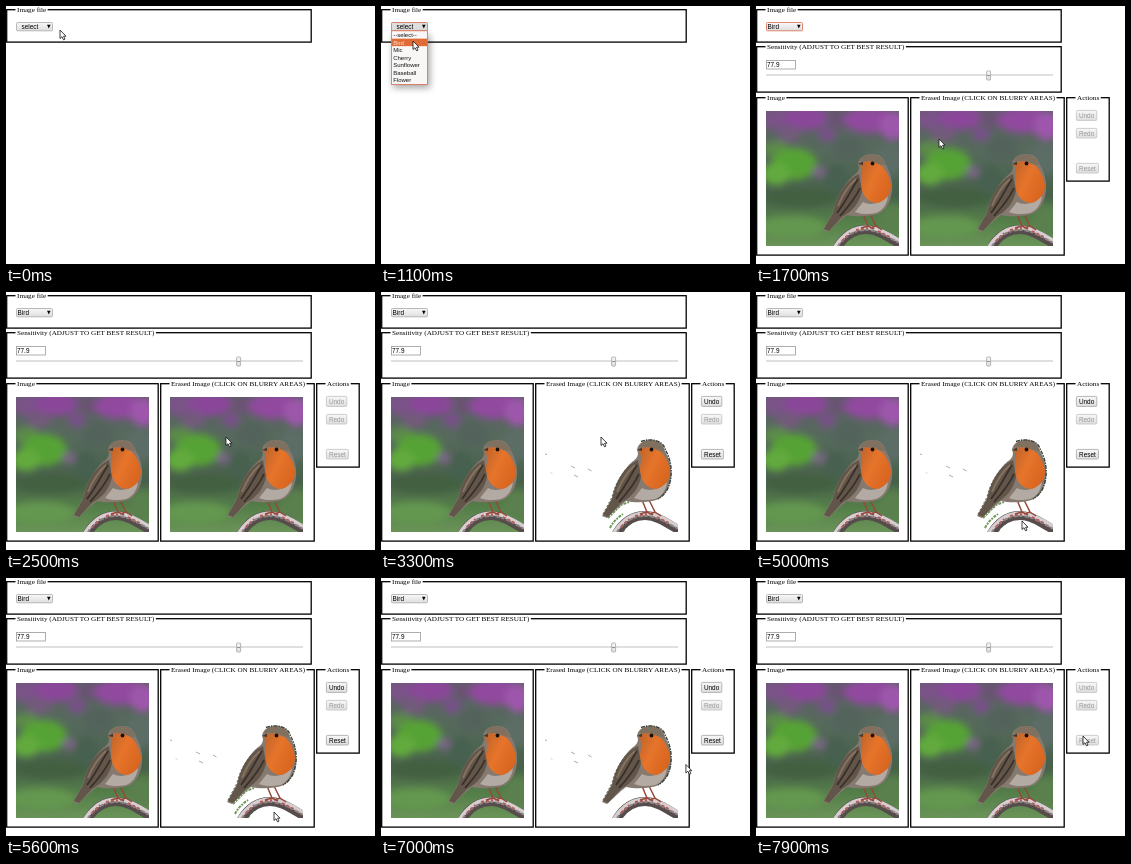
Recreate the animation shown at these times as an HTML page. Size 369 px wide and 258 px high, loop 8000 ms.

```html
<!DOCTYPE html>
<html lang="en">
<head>
<meta charset="utf-8">
<title>Image eraser</title>
<style>
html, body { margin: 0; width: 100%; height: 100%; overflow: hidden; background: #fff; }
svg { display: block; width: 100vw; height: 100vh; }
.legend { font: 7.15px "Liberation Serif", serif; }
.ui { font: 6.4px "Liberation Sans", sans-serif; }
#menu { font-size: 6px; }
</style>
</head>
<body>
<svg id="stage" viewBox="0 0 369 258">
  <defs>
    <linearGradient id="face" x2="0" y2="1"><stop stop-color="#f8f8f8"/><stop offset="1" stop-color="#dedede"/></linearGradient>
    <linearGradient id="ground" x2="0" y2="1">
      <stop stop-color="#5d5f66"/><stop offset=".3" stop-color="#566a5c"/>
      <stop offset=".62" stop-color="#48604a"/><stop offset=".82" stop-color="#557f49"/><stop offset="1" stop-color="#6a9458"/>
    </linearGradient>
    <linearGradient id="breast" x2="1" y2=".6"><stop stop-color="#b9622c"/><stop offset=".5" stop-color="#e6742a"/><stop offset="1" stop-color="#d9651f"/></linearGradient>
    <filter id="soft" x="-50%" y="-50%" width="200%" height="200%"><feGaussianBlur stdDeviation="3.5"/></filter>
    <filter id="haze" x="-30%" y="-30%" width="160%" height="160%"><feGaussianBlur stdDeviation=".7"/></filter>
    <filter id="shade" x="-50%" y="-50%" width="200%" height="200%"><feGaussianBlur stdDeviation="3.5"/></filter>
    <clipPath id="photo"><rect x="10" y="105" width="133" height="135"/></clipPath>
    <path id="body" d="M102 158C103 151 109 148 116 148C123 148 128 151 130 159C134 166 137 175 136 184C135 196 130 203 124 207C115 211 99 211 91 209L86 213L72 226L67 224L77 206C80 192 87 179 97 170C103 166 104 162 102 158Z"/>

    <g id="garden" clip-path="url(#photo)">
      <rect x="10" y="105" width="133" height="135" fill="url(#ground)"/>
      <g filter="url(#soft)">
        <ellipse cx="20" cy="113" rx="14" ry="11" fill="#7a5288"/>
        <ellipse cx="50" cy="112" rx="22" ry="12" fill="#8a469a"/>
        <ellipse cx="33" cy="129" rx="12" ry="7" fill="#735a7c"/>
        <ellipse cx="82" cy="113" rx="9" ry="9" fill="#6a5273"/>
        <ellipse cx="115" cy="114" rx="27" ry="13" fill="#91499f"/>
        <ellipse cx="137" cy="120" rx="13" ry="14" fill="#9d57ab"/>
        <ellipse cx="71" cy="128" rx="9" ry="7" fill="#78508a"/>
        <ellipse cx="92" cy="142" rx="16" ry="13" fill="#52645c"/>
        <ellipse cx="134" cy="154" rx="15" ry="16" fill="#5c6d66"/>
        <ellipse cx="20" cy="143" rx="13" ry="8" fill="#5b8a49"/>
        <ellipse cx="38" cy="158" rx="23" ry="16" fill="#57a336"/>
        <ellipse cx="20" cy="168" rx="14" ry="11" fill="#62aa3c"/>
        <ellipse cx="63" cy="166" rx="7" ry="6" fill="#7a6585"/>
        <ellipse cx="80" cy="174" rx="12" ry="15" fill="#466050"/>
        <ellipse cx="45" cy="192" rx="36" ry="9" fill="#42603f"/>
        <ellipse cx="36" cy="221" rx="34" ry="11" fill="#63974f"/>
        <ellipse cx="137" cy="214" rx="15" ry="16" fill="#5a804d"/>
      </g>
    </g>

    <g id="bird" clip-path="url(#photo)">
      <path d="M80 244C88 229 98 223.500 110 223.500C122 223.500 132 231 147 240" fill="none" stroke="#574c4c" stroke-width="9"/>
      <path d="M79 241C88 227 98 221.500 110 221.500C122 221.500 132 228 147 237" fill="none" stroke="#d6ced0" stroke-width="4"/>
      <path d="M82 240C90 229 99 224 110 224C122 224 132 231 145 238" fill="none" stroke="#8f8585" stroke-width="2" stroke-dasharray="3 2 5 1"/>
      <path d="M86 235L94 227M100 224L112 222M122 225L134 231" stroke="#b65a5a" stroke-width="1.800" stroke-dasharray="3 2"/>
      <path d="M107 208L112 220L105 222M112 220L118 223M114 208L120 220L114 222M120 220L126 224" fill="none" stroke="#96483a" stroke-width="1.500"/>
      <g filter="url(#haze)">
        <use href="#body" fill="#867a70"/>
        <path d="M107 196C114 200 124 198 132 190C131 199 126 205 120 207C112 209 103 208 99 206Z" fill="#b3aaa3"/>
        <path d="M104 155C106 149 111 148.500 116 148.500C123 149 128 152 129.500 159C124 159 117 156 112 155Z" fill="#80705f"/>
        <path d="M103 158C109 154 116 155 122 158C128 160 133 168 135 179C135 188 130 194 122 197C113 197 106 190 105 179C105 171 108 166 104 159Z" fill="url(#breast)"/>
        <path d="M103 168C94 172 85 182 80 196L77 207L68 223L73 225L86 211C97 205 104 196 106 185Z" fill="#62554a"/>
        <path d="M102 173C96 182 92 192 81 207M104 182C100 191 93 200 84 210" fill="none" stroke="#382f28" stroke-width="1.800"/>
        <path d="M100 173C92 180 86 190 82 200" fill="none" stroke="#86735f" stroke-width="2"/>
      </g>
      <path d="M102 158L107 155.500L107 159Z" fill="#453a32"/>
      <circle cx="116.500" cy="157.500" r="1.900" fill="#15110f"/>
    </g>

    <g id="rest" fill="none">
      <path d="M106 149.500C116 146 128 148 130.500 158C135 166 138 178 135 190C133 199 128 204 123 207" stroke="#39413a" stroke-width="1.400" stroke-dasharray="4 1 1.500 1"/>
      <path d="M68 222L77 205C80 191 88 179 98 170" stroke="#4f5a49" stroke-width=".9" stroke-dasharray="2 2"/>
      <path d="M10 162l2 .5M16 180.500l1 1M36 174l4 2M39 183l4 2M53 177l3.500 2" stroke="#888" stroke-width=".7"/>
    </g>
    <g id="fringe" fill="none" stroke="#6f9a5c" clip-path="url(#photo)">
      <path d="M75 236C78 230 82 226 88 222M73 226L86 213L94 210" stroke-width="2" stroke-dasharray="3 1 2 1"/>
      <path d="M88 240C91 235 94 232 98 230" stroke-width="1.500" stroke-dasharray="3 2"/>
    </g>
  </defs>

  <rect width="369" height="258" fill="#fff"/>
  <g id="frames"></g>
  <g id="panels">
    <rect x="10.500" y="54.500" width="29" height="8.500" fill="#fff" stroke="#999" stroke-width=".8"/>
    <text class="ui" x="11" y="61">77.9</text>
    <path d="M10 69H297" stroke="#c4bebe" stroke-width="1.200"/>
    <rect x="230.600" y="65" width="4" height="9" rx=".8" fill="url(#face)" stroke="#a5a5a5" stroke-width=".8"/>
    <path d="M231.200 69.500H234" stroke="#777" stroke-width=".8"/>
    <use href="#garden"/><use href="#bird"/>
    <g transform="translate(154)">
      <use id="back" href="#garden"/><use id="green" href="#fringe"/><use href="#bird"/><use id="edge" href="#rest"/>
    </g>
    <g id="buttons"></g>
  </g>
  <rect id="box" x="10.500" y="16.500" width="36" height="8.300" rx="1" stroke-width=".8"/>
  <text id="choice" class="ui" y="23"></text>
  <path d="M41 18.800h3.600l-1.800 3.600z"/>
  <g id="menu" class="ui">
    <rect x="12" y="29" width="37" height="53" opacity=".35" filter="url(#shade)"/>
    <rect x="10.500" y="24.800" width="36" height="53.700" fill="#f9f7f6" stroke="#d96b4e" stroke-width=".8"/>
    <rect id="mark" x="10.900" width="35.200" height="7.500" fill="#df6c36"/>
  </g>
  <path id="cursor" d="M0 0V8.500L2 6.700L3.500 9.800L5 9.100L3.600 6.200H6Z" fill="#fff" stroke="#111" stroke-width=".8" stroke-linejoin="round"/>
</svg>
<script>
const LOOP = 8000, STEP = 100, ROW = 7.55;
const $ = id => document.getElementById(id);

function add(parent, tag, attrs, text = "") {
  const el = document.createElementNS("http://www.w3.org/2000/svg", tag);
  set(el, attrs);
  el.textContent = text;
  return parent.appendChild(el);
}
function set(el, attrs) {
  for (const k in attrs) el.setAttribute(k, attrs[k]);
}
const show = (el, on) => set(el, { display: on ? "inline" : "none" });

function fieldset(parent, x, y, right, bottom, title) {
  add(parent, "rect", { x: x + .7, y: y + .7, width: right - x - 1.5, height: bottom - y - 1.6,
    fill: "none", stroke: "#000", "stroke-width": 1.3 });
  const label = add(parent, "text", { class: "legend", x: x + 11, y: y + 3 }, title);
  const gap = add(parent, "rect", { x: x + 9.5, y: y - 1, width: label.getComputedTextLength() + 3, height: 4, fill: "#fff" });
  parent.insertBefore(gap, label);
}
function button(y, w, h, label) {
  const face = add($("buttons"), "rect", { x: 320.4, y: y + .4, width: w, height: h, rx: 1, "stroke-width": .8 });
  const text = add($("buttons"), "text", { class: "ui", x: 320.4 + w / 2, y: y + 7.5, "text-anchor": "middle" }, label);
  return (on, down) => {
    set(face, { fill: down ? "#d2d2d2" : "url(#face)", stroke: on ? "#a5a5a5" : "#c2c2c2" });
    set(text, { fill: on ? "#000" : "#999" });
  };
}

fieldset($("frames"), 0, 3, 306, 37, "Image file");
const panels = add($("frames"), "g", {});
fieldset(panels, 0, 40, 306, 87, "Sensitivity (ADJUST TO GET BEST RESULT)");
fieldset(panels, 0, 91, 153, 250, "Image");
fieldset(panels, 154, 91, 309, 250, "Erased Image (CLICK ON BLURRY AREAS)");
fieldset(panels, 310, 91, 354, 176, "Actions");

const undo = button(104, 20.4, 10, "Undo");
const redo = button(122, 20.4, 9.6, "Redo");
const reset = button(157, 22, 9.6, "Reset");

const options = ["--select--", "Bird", "Mic", "Cherry", "Sunflower", "Baseball", "Flower"]
  .map((name, i) => add($("menu"), "text", { x: 12.2, y: 31 + i * ROW }, name));

// time, x, y of the pointer tip
const path = [
  [0, 54, 24], [300, 34, 18], [500, 34, 18], [1100, 32, 35], [1300, 32, 35],
  [1700, 183, 133], [2100, 220, 145], [3600, 220, 145], [4000, 255, 205], [4400, 266, 229],
  [5200, 266, 229], [5600, 268, 234], [6500, 268, 234], [7300, 327, 158], [LOOP, 327, 158]
];
function pointer(t) {
  const i = path.findIndex(p => p[0] > t);
  const [t0, x0, y0] = path[i - 1], [t1, x1, y1] = path[i];
  const k = (t - t0) / (t1 - t0);
  return [x0 + (x1 - x0) * k, y0 + (y1 - y0) * k];
}

function render(t) {
  const within = (a, b) => t >= a && t < b;
  const [x, y] = pointer(t);
  const picked = t >= 1400, loaded = t >= 1500, erased = within(3300, 7800);

  set($("cursor"), { transform: `translate(${x} ${y})` });
  show(panels, loaded);
  show($("panels"), loaded);

  set($("box"), {
    fill: within(200, 1400) ? "#dedede" : "url(#face)",
    stroke: within(500, 2500) ? "#d96b4e" : "#aaa"
  });
  $("choice").textContent = picked ? "Bird" : "select";
  set($("choice"), { x: picked ? 11.6 : 15.6 });

  show($("menu"), within(500, 1400));
  const row = y > 32 ? 1 : 0;
  set($("mark"), { y: 25.1 + row * ROW });
  options.forEach((o, i) => set(o, { fill: i === row ? "#ffe5d8" : "#111" }));

  show($("back"), !erased);
  show($("edge"), erased);
  show($("green"), within(3300, 6200));
  undo(erased);
  redo(false);
  reset(erased, within(7600, 7800));
}

let start;
function tick(now) {
  start ??= now;
  const t = (now - start) % LOOP;
  render(Math.floor(t / STEP) * STEP);
  requestAnimationFrame(tick);
}
render(0);
requestAnimationFrame(tick);
</script>
</body>
</html>
```
